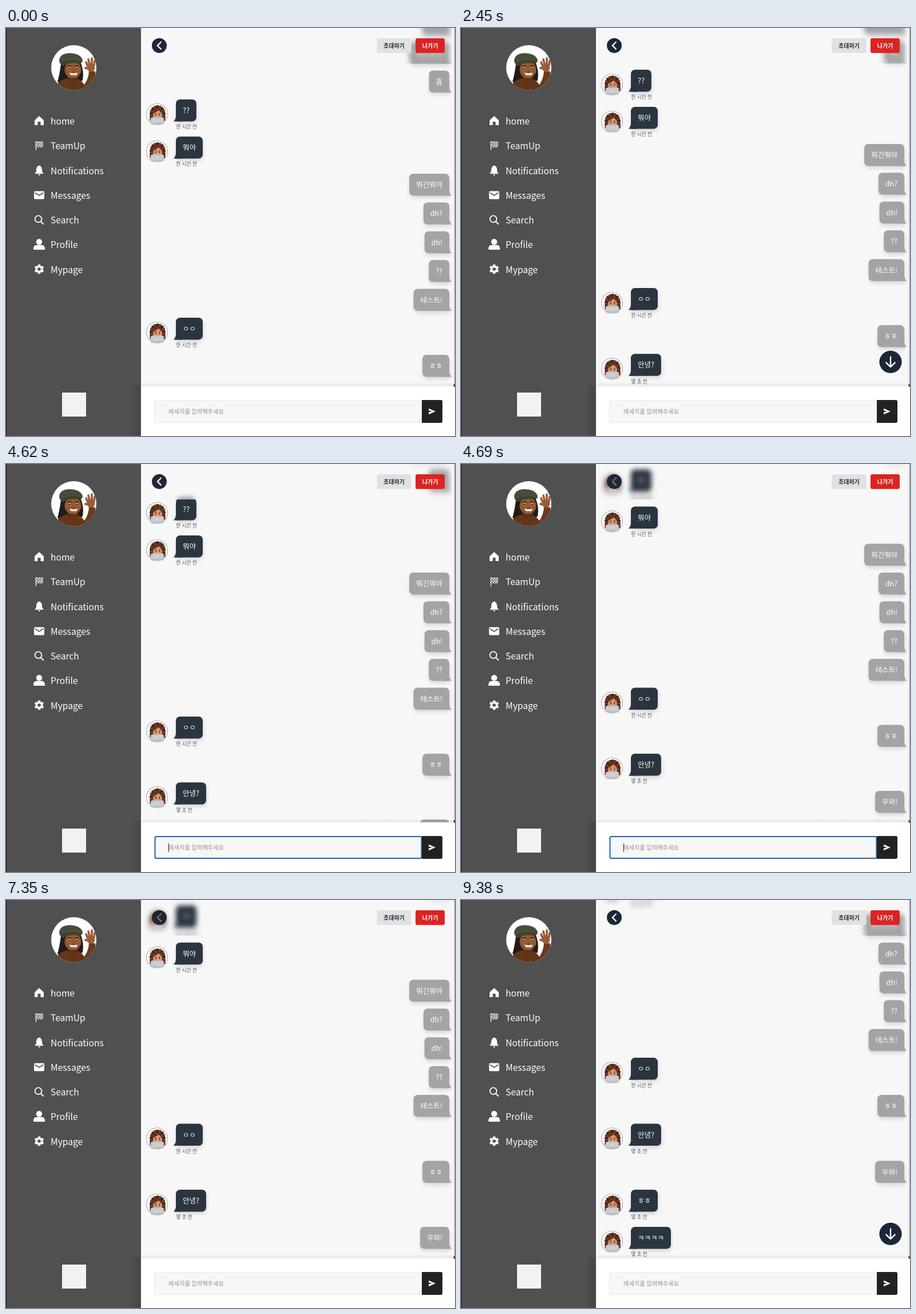
Write an HTML page with a canvas that moves like this. It is 785x714 px and loops after 9800 ms.

```html
<!DOCTYPE html>
<html lang="ko">
<head>
<meta charset="utf-8">
<title>Chat</title>
<style>
html, body { margin: 0; width: 100%; height: 100%; overflow: hidden; background: #f7f7f7; }
canvas { display: block; }
</style>
</head>
<body>
<canvas id="stage" width="785" height="714"></canvas>
<script>
(() => {
const W = 785, H = 714, LOOP = 9800;
const SIDE = 236, HEADER = 62, COMPOSER = 627;
const FONT = '"Noto Sans CJK KR", "Noto Sans CJK JP", sans-serif';
const NAVY = '#1c2838';

const stage = document.getElementById('stage').getContext('2d');
const makeLayer = (w, h) => {
  const c = document.createElement('canvas');
  c.width = w; c.height = h;
  return c.getContext('2d');
};
const PAD = 20;
const page = makeLayer(W, H);
const strip = makeLayer(W, HEADER + 2 * PAD);
const side = makeLayer(SIDE, H);

// [text, own, time label]
const HOUR = '한 시간 전', NOW = '몇 초 전';
const messages = [
  ['ㅎㅎ', true], ['뭐긴뭐야', true], ['흠', true],
  ['??', false, HOUR], ['뭐야', false, HOUR],
  ['뭐긴뭐야', true], ['dh?', true], ['dh!', true], ['??', true], ['테스트!', true],
  ['ㅇㅇ', false, HOUR], ['ㅎㅎ', true], ['안녕?', false, NOW],
  ['우와!', true], ['ㅎㅎ', false, NOW], ['ㅋㅋㅋㅋ', false, NOW]
].map(([text, own, time]) => ({ text, own, time }));
let nextY = -26.3;
for (const m of messages) {
  m.y = nextY;
  nextY += m.own ? 50.4 : 65;
}

// [start, scroll, message count, jump button]
const views = [
  [0, 0, 12, false], [1120, 0, 13, true], [1190, 50.4, 13, true],
  [2450, 52, 13, true], [2520, 59.5, 13, true], [2590, 65, 13, false],
  [4620, 65, 14, false], [4690, 115.4, 14, false],
  [8190, 115.4, 15, true], [8260, 165.8, 15, true], [9380, 230.8, 16, true]
];
// [start, text, caret]
const inputs = [
  [0, '', false], [3640, '', true], [3990, '우', true], [4200, '웅', true],
  [4270, '우와', true], [4480, '우와!', true], [4620, '', true],
  [5040, '', false], [5530, '', true], [6090, '', false], [6580, '', true], [7140, '', false]
];
const at = (list, t) => list.filter(k => k[0] <= t).pop();

function label(c, str, x, y, size, color, weight = 400) {
  c.font = `${weight} ${size}px ${FONT}`;
  c.fillStyle = color;
  c.fillText(str, x, y);
}
function ellipse(c, x, y, rx, ry, color) {
  c.fillStyle = color;
  c.beginPath();
  c.ellipse(x, y, rx, ry, 0, 0, Math.PI * 2);
  c.fill();
}
function circle(c, x, y, r, color) {
  ellipse(c, x, y, r, r, color);
}
function box(c, x, y, w, h, r, color) {
  c.fillStyle = color;
  c.beginPath();
  c.roundRect(x, y, w, h, r);
  c.fill();
}
function shape(c, d, color, rule = 'nonzero') {
  c.fillStyle = color;
  c.fill(new Path2D(d), rule);
}
function line(c, d, color, width) {
  c.strokeStyle = color;
  c.lineWidth = width;
  c.lineCap = c.lineJoin = 'round';
  c.stroke(new Path2D(d));
}

function drawFriend(c, x, y) {
  c.save();
  c.translate(x, y);
  circle(c, 0, 0, 19.2, '#b9bec2');
  circle(c, 0, 0, 17.8, '#fff');
  ellipse(c, 1, -4, 11, 11, '#5b2f1d');
  for (let i = 0; i < 11; i++) {
    const a = Math.PI * (0.85 + i * 0.13);
    circle(c, 1 + 11 * Math.cos(a), -2 + 11 * Math.sin(a), 2.8, i % 2 ? '#4c2416' : '#6f3c24');
  }
  for (const s of [-1, 1]) {
    for (let i = 0; i < 4; i++) circle(c, 1 + s * 11.2, i * 3.4 - 1, 2.6, i % 2 ? '#743f27' : '#4c2416');
  }
  ellipse(c, 1, 1, 7.8, 8.5, '#d99b78');
  shape(c, 'M-8-1Q-6-11 2-11Q9-11 10-1Q6-3 3-7Q-2-3-8-1Z', '#643520');
  for (const s of [-1, 1]) {
    line(c, `M${1 + s * 5}-1L${1 + s * 2}-1`, '#4b2819', 0.9);
    circle(c, 1 + s * 3.3, 1.6, 1.1, '#2f1d17');
  }
  box(c, -11, 5.5, 23, 12, 2, '#b9bcc3');
  box(c, -10, 6.2, 21, 9, 1.5, '#c9ccd1');
  circle(c, 0.5, 11, 1.1, '#eceef0');
  c.restore();
}

function drawProfile(c) {
  c.save();
  circle(c, 118.5, 69.5, 39.5, '#fff');
  c.beginPath();
  c.arc(118.5, 69.5, 39.5, 0, Math.PI * 2);
  c.clip();
  shape(c, 'M96 63Q94 80 90 94Q100 103 112 98L134 92Q137 74 130 60Z', '#211c1a');
  shape(c, 'M84 112Q88 91 108 88L125 89Q135 93 141 106L144 114Z', '#633619');
  shape(c, 'M136 101Q145 88 145 74L156 76Q158 94 145 108Z', '#6a3a1c');
  ellipse(c, 117, 87, 9, 7, '#5b3017');
  ellipse(c, 117, 73, 14.5, 15, '#94582f');
  shape(c, 'M100 67Q106 60 124 61Q131 62 133 69L131 62L102 60Z', '#211c1a');
  shape(c, 'M93 58Q93 45 110 44Q130 44 134 56Q134 62 128 62Q112 58 100 66Q94 64 93 58Z', '#484c3b');
  line(c, 'M98 63Q113 55 130 60', '#383c2d', 2.5);
  for (const x of [111, 124]) {
    line(c, `M${x - 3} 67Q${x} 65 ${x + 3} 67`, '#38200f', 1.3);
    ellipse(c, x, 71, 2.2, 2.5, '#fff');
    circle(c, x, 71.3, 1.7, '#2a1710');
  }
  ellipse(c, 118.5, 75.5, 2.4, 1.5, '#834920');
  shape(c, 'M111 78Q118 81 125 78Q123 86 118 85Q113 84 111 78Z', '#fff');
  shape(c, 'M113 82Q118 83 123 82Q121 86 118 85Q114 85 113 82Z', '#9e4f42');
  ellipse(c, 148.5, 69, 7, 7.5, '#9a5d36');
  line(c, 'M143 67L140 60M146 64L144 55M150 63L150 53M154 65L155 57', '#9a5d36', 3.7);
  line(c, 'M145 71L139 70', '#9a5d36', 4);
  c.restore();
}

function drawIcons(c) {
  const white = '#fff';
  shape(c, 'M58 154L66 161.5V170H60.5V164H55.5V170H50V161.5Z', white);

  line(c, 'M52.3 199V213', white, 1.3);
  for (let i = 0; i < 20; i++) {
    const col = i % 5, row = Math.floor(i / 5);
    if ((col + row) % 2 === 0) box(c, 53.5 + col * 2.2, 199 + row * 2.3, 2.2, 2.3, 0, white);
  }
  line(c, 'M53 199.2H64V208.3H53', white, 0.6);

  shape(c, 'M58 240.5Q63 242 63 248Q63 253 65.5 254V255H50.5V254Q53 253 53 248Q53 242 58 240.5ZM56 256H60Q59.5 258 58 258Q56.5 258 56 256Z', white);

  box(c, 49, 285.5, 18, 14, 2, white);
  line(c, 'M51 288.5L58 293L65 288.5', '#505050', 1.5);

  c.strokeStyle = white;
  c.lineWidth = 1.8;
  c.beginPath();
  c.arc(56.5, 334.3, 5.9, 0, Math.PI * 2);
  c.stroke();
  line(c, 'M61 339L65.2 343', white, 2);

  circle(c, 58, 374.2, 5.2, white);
  shape(c, 'M48 388V385Q49 379.7 54 379.7H62Q67 379.7 68 385V388Z', white);

  for (let i = 0; i < 6; i++) {
    c.save();
    c.translate(58, 422);
    c.rotate(i * Math.PI / 3);
    box(c, -2.2, -8.3, 4.4, 5, 1, white);
    c.restore();
  }
  circle(c, 58, 422, 6.3, white);
  circle(c, 58, 422, 2.8, '#505050');
}

function drawSide(c) {
  box(c, 0, 0, SIDE, H, 0, '#505050');
  const shade = c.createLinearGradient(219, 0, SIDE, 0);
  shade.addColorStop(0, 'rgba(0,0,0,0.03)');
  shade.addColorStop(1, 'rgba(0,0,0,0.12)');
  box(c, 220, 625, 16, 89, [10, 0, 0, 0], shade);
  box(c, 0, 0, 1, H, 0, '#111');
  drawProfile(c);
  drawIcons(c);
  ['home', 'TeamUp', 'Notifications', 'Messages', 'Search', 'Profile', 'Mypage']
    .forEach((s, i) => label(c, s, 78, 168.9 + 43.3 * i, 15.6, '#fff'));
  box(c, 98, 638, 42, 42, 0, '#f2f2f2');
}

function drawMessage(c, m, y) {
  const h = 38.5, size = 12.5;
  c.font = `400 ${size}px ${FONT}`;
  const w = c.measureText(m.text).width + 24;
  const x = m.own ? 775 - w : 297;
  const color = m.own ? '#a4a4a4' : '#2a3540';
  c.save();
  c.shadowColor = 'rgba(0,0,0,0.13)';
  c.shadowBlur = 7;
  c.shadowOffsetX = 1;
  c.shadowOffsetY = 4;
  box(c, x, y, w, h, m.own ? [7, 7, 0, 7] : [7, 7, 7, 0], color);
  c.restore();
  const b = y + h;
  shape(c, m.own
    ? `M775 ${b - 9}Q775.5 ${b - 3} 779.5 ${b}H764V${b - 9}Z`
    : `M297 ${b - 9}Q296.5 ${b - 3} 292.5 ${b}H308V${b - 9}Z`, color);
  label(c, m.text, x + 12, y + 24, size, '#fff');
  if (!m.own) {
    drawFriend(c, 264, y + 26);
    label(c, m.time, 297.3, y + 51.4, 8.9, '#555');
  }
}

// Blurs the strip under the header, mirroring its edges.
function blurHeader() {
  const src = page.canvas;
  strip.clearRect(0, 0, W, HEADER + 2 * PAD);
  strip.drawImage(src, 0, 0, W, HEADER, 0, PAD, W, HEADER);
  strip.save();
  strip.scale(1, -1);
  strip.drawImage(src, 0, 0, W, PAD, 0, -PAD, W, PAD);
  strip.drawImage(src, 0, HEADER - PAD, W, PAD, 0, -(HEADER + 2 * PAD), W, PAD);
  strip.restore();
  stage.save();
  stage.beginPath();
  stage.rect(SIDE, 0, 543, HEADER);
  stage.clip();
  stage.filter = 'blur(4px)';
  stage.drawImage(strip.canvas, 0, -PAD);
  stage.restore();
}

function drawHeader(c) {
  // The chevron is a hole in the disc.
  shape(c, 'M255 30.8a13 13 0 1 0 26 0a13 13 0 1 0-26 0Z' +
    'M270.6 23.2L272.3 24.8L266.5 30.7L272.3 36.6L270.6 38.2L263.2 30.7Z', NAVY, 'evenodd');
  box(c, 648.5, 18, 60, 25.7, 3, '#e0e1e4');
  label(c, '초대하기', 660, 34.6, 10, '#24272c', 700);
  box(c, 716, 18, 51, 25.7, 3, '#dc2323');
  label(c, '나가기', 727.8, 34.6, 10, '#fff', 700);
}

function drawComposer(c, t) {
  const glow = c.createLinearGradient(0, 620, 0, COMPOSER);
  glow.addColorStop(0, 'rgba(0,0,0,0.025)');
  glow.addColorStop(1, 'rgba(0,0,0,0.065)');
  box(c, 237, 621.5, 546, 6, [14, 14, 0, 0], glow);
  box(c, SIDE, COMPOSER, W - SIDE, H - COMPOSER, 0, '#fff');
  box(c, 783, 0, 2, COMPOSER, 0, '#c6c6c6');
  box(c, 782.5, 623.5, 2.5, 4, 0, '#333');

  const focused = t >= 3640 && t < 7350;
  c.beginPath();
  if (focused) c.roundRect(260.5, 652, 466, 38, 2);
  else c.roundRect(259.5, 651.5, 467.5, 39, 1);
  c.fillStyle = '#f7f7f7';
  c.fill();
  c.lineWidth = focused ? 2 : 1;
  c.strokeStyle = focused ? '#1f65ad' : '#e9e9e9';
  c.stroke();

  const [, text, caret] = at(inputs, t);
  label(c, text || '메세지를 입력해주세요', 284, 675.4, 10.3, text ? '#222' : '#929298');
  if (caret) {
    const x = 284 + (text ? c.measureText(text).width : 0);
    box(c, x, 664, 1, 15, 0, '#222');
  }
  box(c, 727, 651, 36, 40, [1, 3, 3, 1], '#222');
  shape(c, 'M739 665.8L751 671L739 676.2V672.4L745 671L739 669.6Z', '#fff');
}

function drawJump(c) {
  circle(c, 751, 584.3, 19.6, NAVY);
  line(c, 'M751 575.5V593M743.2 585.6L751 593.2L758.8 585.6', '#fff', 2.4);
}

function render(t) {
  const [, scroll, count, jump] = at(views, t);
  box(page, 0, 0, W, H, 0, '#f7f7f7');
  for (const m of messages.slice(0, count)) drawMessage(page, m, m.y - scroll);
  stage.drawImage(page.canvas, 0, 0);
  blurHeader();
  drawHeader(stage);
  drawComposer(stage, t);
  if (jump) drawJump(stage);
  stage.drawImage(side.canvas, 0, 0);
}

drawSide(side);
const start = performance.now();
function tick() {
  render((performance.now() - start) % LOOP);
  requestAnimationFrame(tick);
}
tick();
})();
</script>
</body>
</html>
```
